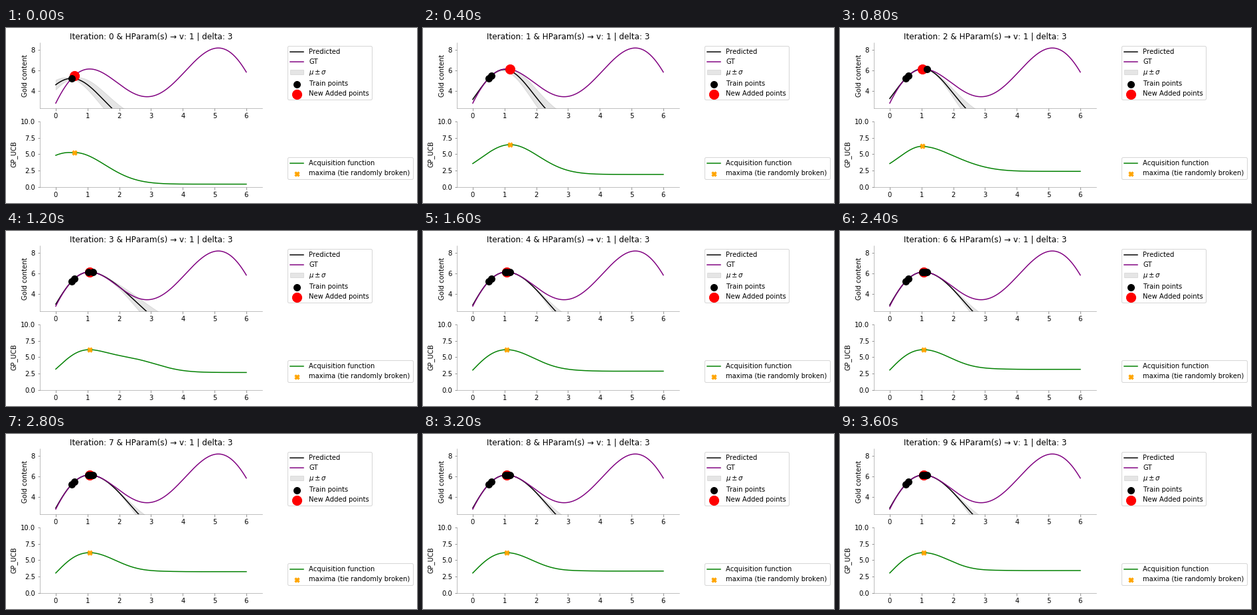
A matplotlib script for the animation above (4 s loop, 619 by 264 pixels).

```python
import numpy as np
import matplotlib.pyplot as plt
from matplotlib.animation import FuncAnimation

W, H, DPI = 619, 264, 72
STEPS = 10
SPINE = "gray"

plt.rcParams.update({"font.family": "DejaVu Sans", "font.size": 10,
                     "text.kerning_factor": 6})

grid = np.linspace(0, 6, 1000)


def truth(x):
    z = np.asarray(x) - 3
    return 3.5 + 0.5 * z + 2 * z * np.sin(z)


def rbf(a, b):
    return np.exp(-0.5 * (a[:, None] - b[None, :]) ** 2)


def posterior(xs):
    """Mean and deviation of a unit RBF Gaussian process on the grid."""
    xs = np.array(xs)
    chol = np.linalg.cholesky(rbf(xs, xs) + 1e-10 * np.eye(len(xs)))
    weights = np.linalg.solve(chol.T, np.linalg.solve(chol, truth(xs)))
    cross = rbf(grid, xs)
    part = np.linalg.solve(chol, cross.T)
    var = 1 - (part ** 2).sum(axis=0)
    return cross @ weights, np.sqrt(np.clip(var, 0, None))


def ucb_weight(t, v=1, delta=3):
    return np.sqrt(2 * v * np.log(t ** 2.5 * np.pi ** 2 / (3 * delta)))


def run():
    xs, states = [0.5], []
    for t in range(1, STEPS + 1):
        mean, dev = posterior(xs)
        acq = mean + ucb_weight(t) * dev
        best = np.argmax(acq)
        states.append((list(xs), mean, dev, acq, best))
        xs.append(grid[best])
    return states


def make_axes(bottom, ylim, ylabel):
    ax = fig.add_axes([51.03 / W, bottom / H, 334.8 / W, 98.84 / H])
    ax.set(xlim=(-0.5, 6.5), ylim=ylim, ylabel=ylabel, xticks=range(7))
    ax.spines[["top", "right"]].set_visible(False)
    for side in ("left", "bottom"):
        ax.spines[side].set(color=SPINE, linewidth=0.5)
    ax.tick_params(direction="out", color=SPINE)
    return ax


def band_outline(mean, dev):
    x = np.concatenate([grid, grid[::-1]])
    y = np.concatenate([mean - dev, (mean + dev)[::-1]])
    return np.column_stack([x, y])


states = run()
gold = truth(grid)
fig = plt.figure(figsize=(W / DPI, H / DPI), dpi=DPI, facecolor="white")
top = make_axes(142.8, (gold.min() - 0.5, gold.max() + 0.5), "Gold content")
low = make_axes(24.2, (0, 10), "GP_UCB")
top.set_yticks([4, 6, 8])
low.set_yticks([0, 2.5, 5, 7.5, 10])

pred, = top.plot([], [], color="black", label="Predicted")
top.plot(grid, gold, color="purple", label="GT")
band = top.fill_between(grid, grid, grid, color="gray", alpha=0.2,
                        label=r"$\mu \pm \sigma$")
train = top.scatter([], [], s=100, color="black", zorder=11,
                    label="Train points")
new = top.scatter([], [], s=200, color="red", zorder=10,
                  label="New Added points")
acq_line, = low.plot([], [], color="green", label="Acquisition function")
peak = low.scatter([], [], s=50, color="orange", marker="X", zorder=10,
                   label="maxima (tie randomly broken)")
title = top.set_title("")
top.legend(loc="upper left", bbox_to_anchor=(1.1, 1))
low.legend(loc="upper left", bbox_to_anchor=(1.1, 0.5))


def update(i):
    xs, mean, dev, acq, best = states[i]
    x = grid[best]
    title.set_text(f"Iteration: {i} & HParam(s) → v: 1 | delta: 3")
    pred.set_data(grid, mean)
    band.set_verts([band_outline(mean, dev)])
    train.set_offsets(np.column_stack([xs, truth(xs)]))
    new.set_offsets([[x, truth(x)]])
    acq_line.set_data(grid, acq)
    peak.set_offsets([[x, acq[best]]])
    return []


anim = FuncAnimation(fig, update, frames=STEPS, init_func=lambda: [],
                     interval=400, repeat=True, repeat_delay=0)
plt.show()
```
